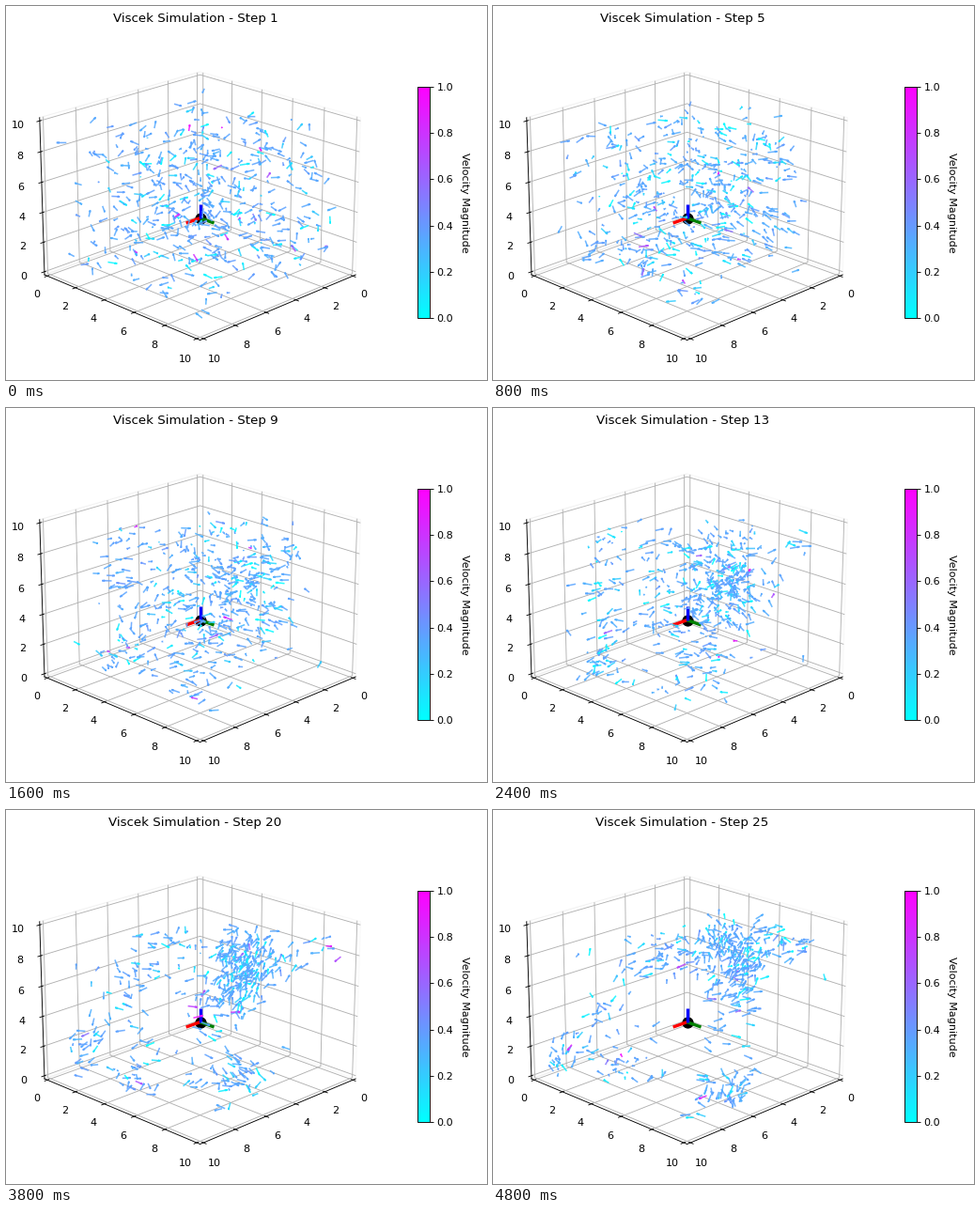
Write a matplotlib script that moves like this. It is 512 px wide and 398 px high and loops after 5 s.

```python
import matplotlib.pyplot as plt
import numpy as np
from matplotlib.animation import FuncAnimation
from matplotlib.cm import ScalarMappable

WIDTH, HEIGHT, DPI = 512, 398, 80
STEPS, INTERVAL = 25, 200
COUNT, BOX, MARGIN = 480, 10.0, 0.4
SPEED, RADIUS, NOISE, PULL = 0.28, 1.2, 0.3, 0.075
ARROW_LENGTH = 0.45

# Gathering points of the flocks
ANCHORS = np.array([
    (7.0, 2.2, 7.6), (8.0, 1.4, 2.9), (8.6, 1.9, 1.0), (3.8, 6.1, 5.0),
    (4.0, 7.2, 6.0), (6.5, 8.2, 1.5), (2.0, 8.0, 8.3), (3.0, 4.3, 8.0),
])


def unit(vectors):
    return vectors / np.linalg.norm(vectors, axis=-1, keepdims=True)


def distances(a, b):
    return np.linalg.norm(a[:, None] - b[None], axis=2)


def magnitudes(rng):
    """Mostly one common speed, some slow particles and a few fast ones."""
    kind = rng.random(COUNT)
    values = rng.normal(0.35, 0.025, COUNT)
    values = np.where(kind < 0.22, rng.uniform(0, 0.25, COUNT), values)
    return np.where(kind > 0.985, rng.uniform(0.5, 0.95, COUNT), values)


def choose_targets(pos, rng):
    """A loose spot around one of the closer gathering points."""
    cost = distances(pos, ANCHORS) + rng.normal(0, 1.8, (COUNT, len(ANCHORS)))
    return ANCHORS[cost.argmin(axis=1)] + rng.normal(0, 0.9, (COUNT, 3))


def simulate():
    rng = np.random.default_rng(12)
    pos = rng.uniform(MARGIN, BOX - MARGIN, (COUNT, 3))
    heading = unit(rng.normal(size=(COUNT, 3)))
    target = choose_targets(pos, rng)
    pull = PULL * (rng.random((COUNT, 1)) < 0.9)
    states = []
    for _ in range(STEPS):
        states.append((pos, heading, magnitudes(rng)))
        near = distances(pos, pos) < RADIUS
        mean = near @ heading / near.sum(axis=1, keepdims=True)
        jitter = NOISE * rng.normal(size=(COUNT, 3))
        heading = unit(mean + jitter + pull * (target - pos))
        pos = pos + SPEED * heading
        outside = (pos < MARGIN) | (pos > BOX - MARGIN)
        heading = np.where(outside, -heading, heading)
        pos = np.clip(pos, MARGIN, BOX - MARGIN)
    return states


def pixel_rect(left, top, width, height):
    return [left / WIDTH, 1 - (top + height) / HEIGHT,
            width / WIDTH, height / HEIGHT]


fig = plt.figure(figsize=(WIDTH / DPI, HEIGHT / DPI), dpi=DPI,
                 facecolor="white")
ax = fig.add_axes(pixel_rect(16.8, 23.9, 369.6, 369.6), projection="3d",
                  computed_zorder=False)
ax.view_init(elev=20.4, azim=45)
for set_limits in (ax.set_xlim, ax.set_ylim, ax.set_zlim):
    set_limits(0, BOX, view_margin=1 / 48)
for axis in (ax.xaxis, ax.yaxis, ax.zaxis):
    axis.pane.set_fill(False)
    axis.set_ticks(range(0, 11, 2))

# Reference frame at the origin
ax.scatter([0], [0], [0], s=100, color="black", depthshade=False, zorder=2)
for direction, color in zip(np.eye(3), ("red", "green", "blue")):
    ax.plot(*([0, end] for end in direction), color=color, lw=3,
            solid_capstyle="butt", zorder=3)

cmap = plt.get_cmap("cool")
cax = fig.add_axes(pixel_rect(438.4, 85.7, 12.3, 246.4))
fig.colorbar(ScalarMappable(plt.Normalize(0, 1), cmap), cax=cax)
fig.text(488 / WIDTH, 1 - 209 / HEIGHT, "Velocity Magnitude",
         rotation=270, ha="center", va="center", fontsize=10)

states = simulate()
arrows = None


def draw(step):
    global arrows
    if arrows is not None:
        arrows.remove()
    pos, heading, speed = states[step]
    arrows = ax.quiver(*pos.T, *heading.T, length=ARROW_LENGTH,
                       colors=cmap(speed, alpha=0.85), lw=1.4, zorder=4)
    ax.set_title(f"Viscek Simulation - Step {step + 1}", fontsize=12)
    return [arrows]


anim = FuncAnimation(fig, draw, frames=STEPS, init_func=lambda: draw(0),
                     interval=INTERVAL, repeat=True, repeat_delay=0,
                     blit=False)
plt.show()
```
